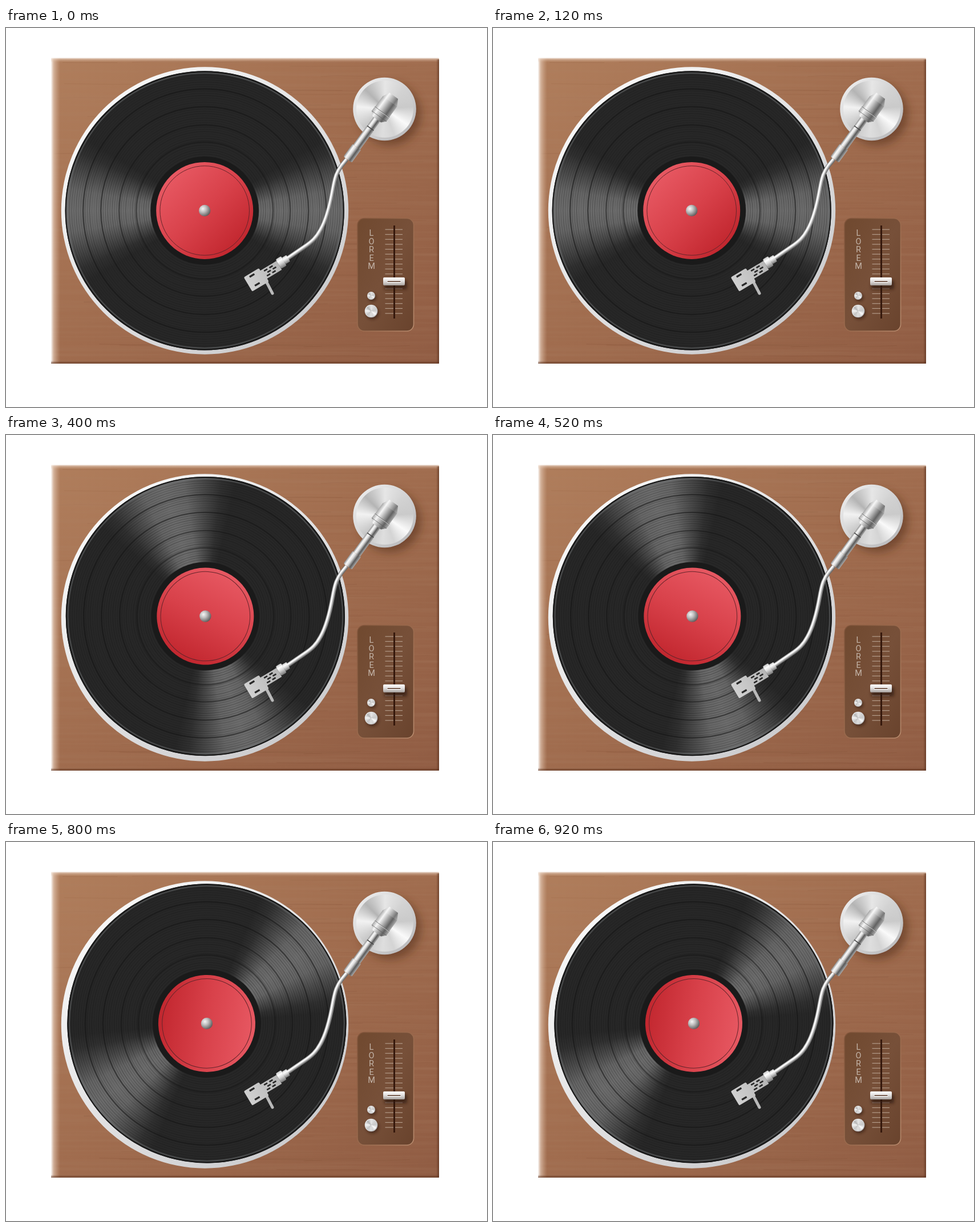
Animation, 843 px wide and 664 px high, one loop 1000 ms. Source, as an HTML page:

```html
<!DOCTYPE html>
<html lang="en">
<head>
<meta charset="utf-8">
<title>Turntable</title>
<style>
  html, body { margin: 0; width: 100%; height: 100%; overflow: hidden; background: #fff; }
  svg { display: block; width: 843px; height: 664px; }
  .disc { width: 100%; height: 100%; border-radius: 50%; }
  .sheen {
    background: conic-gradient(from 270deg, #6c6c6c, #656565 9deg, #4a4a4a 17deg, #303030 25deg, #272727 31deg,
      #272727 149deg, #303030 155deg, #4a4a4a 163deg, #656565 171deg, #6c6c6c 180deg, #656565 189deg,
      #4a4a4a 197deg, #303030 205deg, #272727 211deg, #272727 329deg, #303030 335deg, #4a4a4a 343deg,
      #656565 351deg, #6c6c6c);
  }
  .metal {
    background: conic-gradient(#e6e6e6, #d2d2d2 45deg, #cacaca 85deg, #fafafa 125deg, #d4d4d4 160deg,
      #dedede 185deg, #c4c4c4 225deg, #f2f2f2 275deg, #b4b4b4 315deg, #e6e6e6);
  }
</style>
</head>
<body>
<svg viewBox="0 0 843 664">
  <defs>
    <linearGradient id="wood" x1="0" y1="0" x2="1" y2="1">
      <stop offset="0" stop-color="#b07e5c"/><stop offset=".5" stop-color="#a06c4e"/><stop offset="1" stop-color="#905c43"/>
    </linearGradient>
    <linearGradient id="glowLeft">
      <stop offset="0" stop-color="#fff" stop-opacity=".95"/><stop offset=".3" stop-color="#ecd5c3" stop-opacity=".6"/><stop offset="1" stop-color="#d9b69c" stop-opacity="0"/>
    </linearGradient>
    <linearGradient id="glowTop" x2="0" y2="1">
      <stop offset="0" stop-color="#fff" stop-opacity=".95"/><stop offset=".35" stop-color="#ecd5c3" stop-opacity=".5"/><stop offset="1" stop-color="#d9b69c" stop-opacity="0"/>
    </linearGradient>
    <linearGradient id="shadeRight">
      <stop offset="0" stop-color="#5a301c" stop-opacity="0"/><stop offset="1" stop-color="#5a301c" stop-opacity=".7"/>
    </linearGradient>
    <linearGradient id="shadeBottom" x2="0" y2="1">
      <stop offset="0" stop-color="#5a301c" stop-opacity="0"/><stop offset="1" stop-color="#5a301c" stop-opacity=".7"/>
    </linearGradient>
    <linearGradient id="platter" x1=".15" y1=".1" x2=".85" y2=".9">
      <stop offset="0" stop-color="#f8f8f8"/><stop offset="1" stop-color="#cbcbcd"/>
    </linearGradient>
    <linearGradient id="label" x1=".15" y1=".15" x2=".85" y2=".85">
      <stop offset="0" stop-color="#e75862"/><stop offset=".5" stop-color="#d8414a"/><stop offset="1" stop-color="#c2272f"/>
    </linearGradient>
    <radialGradient id="spindle" cx=".34" cy=".34" r=".72">
      <stop offset="0" stop-color="#f6f6f6"/><stop offset=".4" stop-color="#c0bfbf"/><stop offset="1" stop-color="#595757"/>
    </radialGradient>
    <linearGradient id="rim" x1="0" y1="0" x2="1" y2="1">
      <stop offset="0" stop-color="#f2f2f2"/><stop offset="1" stop-color="#b4b4b6"/>
    </linearGradient>
    <linearGradient id="tube">
      <stop offset="0" stop-color="#8c8c8c"/><stop offset=".22" stop-color="#fafafa"/><stop offset=".42" stop-color="#dcdcdc"/>
      <stop offset=".72" stop-color="#595959"/><stop offset="1" stop-color="#aaa"/>
    </linearGradient>
    <linearGradient id="cap">
      <stop offset="0" stop-color="#a6a6a6"/><stop offset=".22" stop-color="#f6f6f6"/><stop offset=".45" stop-color="#b8b8b8"/>
      <stop offset=".76" stop-color="#626262"/><stop offset="1" stop-color="#a6a6a6"/>
    </linearGradient>
    <linearGradient id="joint" x2="0" y2="1">
      <stop offset="0" stop-color="#c8c8c8"/><stop offset=".28" stop-color="#fff"/><stop offset=".55" stop-color="#d8d8d8"/><stop offset="1" stop-color="#777"/>
    </linearGradient>
    <linearGradient id="shell" x2="1">
      <stop offset="0" stop-color="#d0d0d0"/><stop offset="1" stop-color="#b6b6b6"/>
    </linearGradient>
    <linearGradient id="panel" x2="1" y2="1">
      <stop offset="0" stop-color="#70492f"/><stop offset=".5" stop-color="#775039"/><stop offset="1" stop-color="#69432d"/>
    </linearGradient>
    <linearGradient id="panelEdge" x2="1" y2="1">
      <stop offset="0" stop-color="#80543a"/><stop offset=".5" stop-color="#9a6a4d"/><stop offset="1" stop-color="#b88b6e"/>
    </linearGradient>
    <linearGradient id="handle" x2="0" y2="1">
      <stop offset="0" stop-color="#fff"/><stop offset=".4" stop-color="#e6e4e3"/><stop offset=".7" stop-color="#cbc7c5"/><stop offset="1" stop-color="#a39c98"/>
    </linearGradient>
    <filter id="grain" x="0" y="0" width="1" height="1">
      <feTurbulence type="fractalNoise" baseFrequency=".003 .16" numOctaves="3" seed="7"/>
      <feColorMatrix values="0 0 0 0 .4  0 0 0 0 .22  0 0 0 0 .13  .55 0 0 0 -.24"/>
    </filter>
    <filter id="blur" x="-60%" y="-60%" width="220%" height="220%"><feGaussianBlur stdDeviation="8"/></filter>
    <filter id="soft" x="-60%" y="-60%" width="220%" height="220%"><feGaussianBlur stdDeviation="2.5"/></filter>
  </defs>

  <g id="board">
    <rect x="79" y="52" width="680" height="536" rx="2" fill="url(#wood)"/>
    <rect x="79" y="52" width="680" height="536" filter="url(#grain)"/>
    <g id="veins" fill="none" stroke="#75452d"/>
    <rect x="79" y="52" width="16" height="536" fill="url(#glowLeft)"/>
    <rect x="79" y="52" width="680" height="8" fill="url(#glowTop)"/>
    <rect x="754" y="55" width="5" height="533" fill="url(#shadeRight)"/>
    <rect x="79" y="583" width="680" height="5" fill="url(#shadeBottom)"/>
  </g>

  <circle cx="348.5" cy="320" r="251.7" fill="url(#platter)"/>

  <g id="record">
    <circle r="244.6" fill="#1b1b1b"/>
    <foreignObject x="-243.5" y="-243.5" width="487" height="487"><div class="disc sheen"></div></foreignObject>
    <g id="grooves" fill="none" stroke="#141414"/>
    <circle r="243.5" fill="none" stroke="#191919" stroke-width="2"/>
    <circle r="240.8" fill="none" stroke="#6b6e70" stroke-opacity=".6" stroke-width="1.6"/>
    <circle r="95" fill="#1a1a1a"/>
    <circle r="85" fill="url(#label)"/>
    <circle r="78.3" fill="none" stroke="#65252b" stroke-width="1"/>
  </g>
  <circle id="pin" r="10.2" fill="url(#spindle)"/>

  <g id="pivot">
    <circle cx="673" cy="151" r="54" fill="#4f2915" opacity=".55" filter="url(#blur)"/>
    <circle cx="663.5" cy="142" r="55.3" fill="url(#rim)"/>
    <foreignObject x="613.5" y="92" width="100" height="100"><div class="disc metal"></div></foreignObject>
  </g>

  <g id="arm">
    <g id="pipe" fill="none"></g>
    <g transform="translate(651 158.5) rotate(36)">
      <path d="M-7-2H7V24H-7z" fill="url(#tube)"/>
      <path d="M-7 21H7" stroke="#444" stroke-width="1.5"/>
      <path d="M-7.5 22H7.5V62H-7.5z" fill="url(#tube)"/>
      <path d="M-9 62H9V87Q9 89 7 89H-7Q-9 89-9 87z" fill="url(#tube)"/>
      <path d="M-9 -49H9L15.5-37V-14H-15.5V-37z" fill="url(#cap)"/>
      <path d="M-9 -49H9L15.5-37H-15.5z" fill="#fff" opacity=".15"/>
      <path d="M-16-14H16V-5L9 2H-9L-16-5z" fill="url(#cap)"/>
      <path d="M-16-14H16M-16-5H16" stroke="#555" stroke-opacity=".6"/>
      <path d="M-16-13H16" stroke="#fff" stroke-opacity=".5"/>
    </g>
    <path d="M456 444L467 465" stroke="#b9b9b9" stroke-width="5" stroke-linecap="round"/>
    <g transform="translate(482 411.5) rotate(-31)">
      <path d="M-67-12H-40Q-38-12-38-10V-7H-5V11H-35V15Q-35 17-37 17H-67Q-69 17-69 15V-10Q-69-12-67-12z" fill="url(#shell)"/>
      <g id="slots" fill="#292929"></g>
      <rect x="-5" y="-10" width="11" height="19" rx="2" fill="url(#joint)"/>
      <rect x="6" y="-7" width="9" height="13" rx="1" fill="url(#joint)"/>
    </g>
  </g>

  <g id="controls">
    <rect x="616" y="333.5" width="98.5" height="197.5" rx="12" fill="url(#panel)" stroke="url(#panelEdge)" stroke-width="1.6"/>
    <g id="word" font-family="Roboto, Inter, sans-serif" font-size="14.5" fill="#c4b5a9" text-anchor="middle"></g>
    <g id="ticks" stroke="#b39b89" stroke-width="1.2"></g>
    <path d="M680.5 346V509" stroke="#36190d" stroke-width="3"/>
    <rect x="663" y="442" width="40" height="16" rx="3" fill="#2c1409" opacity=".65" filter="url(#soft)"/>
    <rect x="661" y="437" width="38" height="14" rx="2" fill="url(#handle)"/>
    <path d="M668 444H692" stroke="#fff" stroke-width="4"/>
    <path d="M668.5 444H691.5" stroke="#4e2c1c" stroke-width="1.6"/>
    <g id="knobs"></g>
  </g>
</svg>
<script>
const $ = id => document.getElementById(id);
const fill = (id, n, part) => { $(id).innerHTML = Array.from({ length: n }, (_, i) => part(i)).join(''); };

let seed = 11;
const rnd = () => (seed = seed * 16807 % 2147483647) / 2147483647;

fill('veins', 95, () => {
  const y = 60 + rnd() * 520, len = 90 + rnd() * 300;
  const x = 80 + rnd() * (676 - len), bend = rnd() * 6 - 3;
  return `<path d="M${x} ${y}q${len * .25} ${bend} ${len * .5} ${bend * .4}t${len * .5} ${bend * .4}"
    stroke-width="${.6 + rnd() * .6}" opacity="${.06 + rnd() * .16}"/>`;
});

const ring = (r, w, o) => `<circle r="${r}" stroke-width="${w}" opacity="${o}"/>`;
fill('grooves', 36, i => ring(99 + i * 3.95, 1, .1 + rnd() * .25));
$('grooves').innerHTML += [213, 182, 150, 120].map(r => ring(r, 2.6, .45)).join('');

const curve = 'M597 230L588 241C578 255 576 265 572.5 284C567 315 559 340 551 354C544 367 537 374 522 384L487 408';
const coats = [['#6a6a6a', 7.6, 0], ['#a2a2a2', 5.8, -.3], ['#e0e0e0', 3.6, -.7], ['#fff', 1.6, -.9]];
fill('pipe', coats.length, i => {
  const [color, w, d] = coats[i];
  return `<path d="${curve}" stroke="${color}" stroke-width="${w}" transform="translate(${d} ${d})"/>`;
});

const slot = (x, y, w, h) => `<rect x="${x}" y="${y}" width="${w}" height="${h}" rx=".8"/>`;
fill('slots', 6, i => slot(-33 + i % 2 * 11 + (i >> 1) % 2 * 4, -4.5 + (i >> 1) * 5, 7, 2.7));
$('slots').innerHTML += slot(-60, -9, 10, 3.4) + slot(-60, 9, 10, 3.4);

fill('word', 5, i => `<text x="640.5" y="${364.4 + i * 14.4}">${'LOREM'[i]}</text>`);
fill('ticks', 18, i => `<path d="M664.5 ${353 + i * 8.65}h30.5"/>`);

const knob = (x, y, r) => `<circle cx="${x + 2}" cy="${y + 3}" r="${r}" fill="#2c1409" opacity=".6" filter="url(#soft)"/>
  <circle cx="${x}" cy="${y}" r="${r}" fill="url(#rim)"/>
  <foreignObject x="${x - r + 1}" y="${y - r + 1}" width="${2 * r - 2}" height="${2 * r - 2}"><div class="disc metal"></div></foreignObject>`;
$('knobs').innerHTML = knob(640, 469, 7) + knob(640, 496, 11.3);

// The record turns in hard steps around a point slightly off its own centre.
const STEP = 200, STEPS = 5, TURN = 36;
const AXIS = { x: 350.4, y: 319.5 }, OFFSET = { x: -2.2, y: .4 };

function draw(t) {
  const angle = Math.floor(t / STEP) % STEPS * TURN;
  const a = angle * Math.PI / 180, cos = Math.cos(a), sin = Math.sin(a);
  const x = AXIS.x + OFFSET.x * cos - OFFSET.y * sin;
  const y = AXIS.y + OFFSET.x * sin + OFFSET.y * cos;
  $('record').setAttribute('transform', `translate(${x} ${y}) rotate(${angle})`);
  $('pin').setAttribute('transform', `translate(${x} ${y})`);
}

function loop() {
  draw(performance.now());
  requestAnimationFrame(loop);
}
loop();
</script>
</body>
</html>
```
